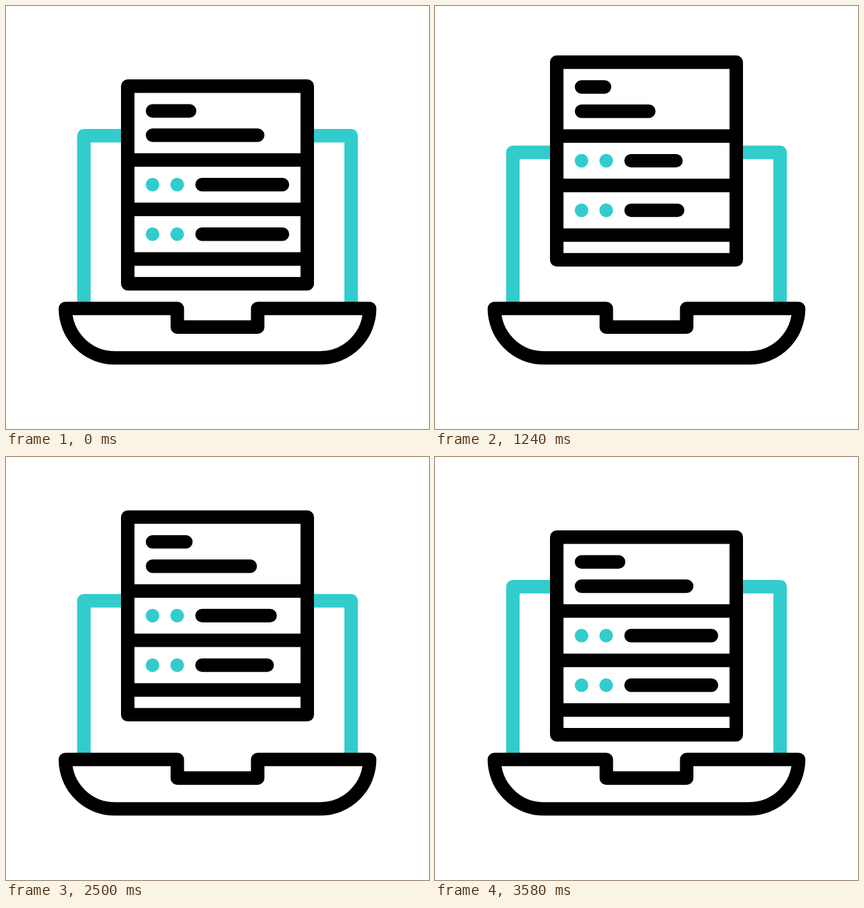
An HTML page that plays this animation: 640x640 px, repeating every 3600 ms.

```html
<!DOCTYPE html>
<html lang="en">
<head>
<meta charset="utf-8">
<title>Laptop document</title>
<style>
  html, body { margin: 0; height: 100%; overflow: hidden; background: #fff; }
  svg { display: block; width: 100%; height: 100%; }
  .ink { fill: none; stroke: #000; stroke-width: 20.4; stroke-linecap: round; stroke-linejoin: round; }
  .paper { fill: #fff; }
  .screen { stroke: #3cc; stroke-linecap: butt; }
  .dots { fill: #3cc; }
</style>
</head>
<body>
<svg viewBox="0 0 640 640">
  <path id="screen" class="ink screen"/>
  <g id="doc">
    <path class="ink paper" d="M184.2 121.2H455.8V420.2H184.2Z"/>
    <path class="ink" d="M184.2 233H455.8M184.2 307.7H455.8M184.2 382.8H455.8"/>
    <g class="dots">
      <circle cx="221.7" cy="270.3" r="10.3"/>
      <circle cx="259" cy="270.3" r="10.3"/>
      <circle cx="221.7" cy="345.3" r="10.3"/>
      <circle cx="259" cy="345.3" r="10.3"/>
    </g>
    <path id="bars" class="ink"/>
  </g>
  <path class="ink" d="M89.8 457.6H259.2V485.7H380.8V457.6H550.2A74.8 74.8 0 0 1 475.4 532.4H164.6A74.8 74.8 0 0 1 89.8 457.6Z"/>
</svg>
<script>
  const LOOP = 3600;
  const [screen, doc, bars] = ['screen', 'doc', 'bars'].map(id => document.getElementById(id));
  const lines = [
    { x: 221.7, y: 158.7, end: 277.8, shrink: 22.9, delay: 60 },
    { x: 221.7, y: 195.5, end: 380.8, shrink: 59.9, delay: 0 },
    { x: 296.6, y: 270.3, end: 418.3, shrink: 59.9, delay: 120 },
    { x: 296.6, y: 345.3, end: 418.3, shrink: 59.9, delay: 180 }
  ];

  // cubic-bezier(.5, 0, .5, 1)
  function ease(x) {
    let lo = 0, hi = 1;
    for (let i = 0; i < 24; i++) {
      const s = (lo + hi) / 2;
      if (1.5 * s * (1 - s) + s ** 3 < x) lo = s; else hi = s;
    }
    return lo * lo * (3 - 2 * lo);
  }

  // Goes 0 -> 1 -> 0, each way lasting `half` ms
  const swing = (t, half) => ease(Math.max(0, 1 - Math.abs(t / half - 1)));

  function draw() {
    const t = performance.now() % LOOP;
    const lift = swing(t, 1790);
    doc.setAttribute('transform', `translate(0 ${-43.5 * lift})`);
    screen.setAttribute('d', `M117.8 457V${196.2 + 30.5 * lift}H522.2V457`);
    bars.setAttribute('d', lines.map(({ x, y, end, shrink, delay }) =>
      `M${x} ${y}H${end - shrink * swing(t - delay, 1490)}`).join(''));
    requestAnimationFrame(draw);
  }
  draw();
</script>
</body>
</html>
```
